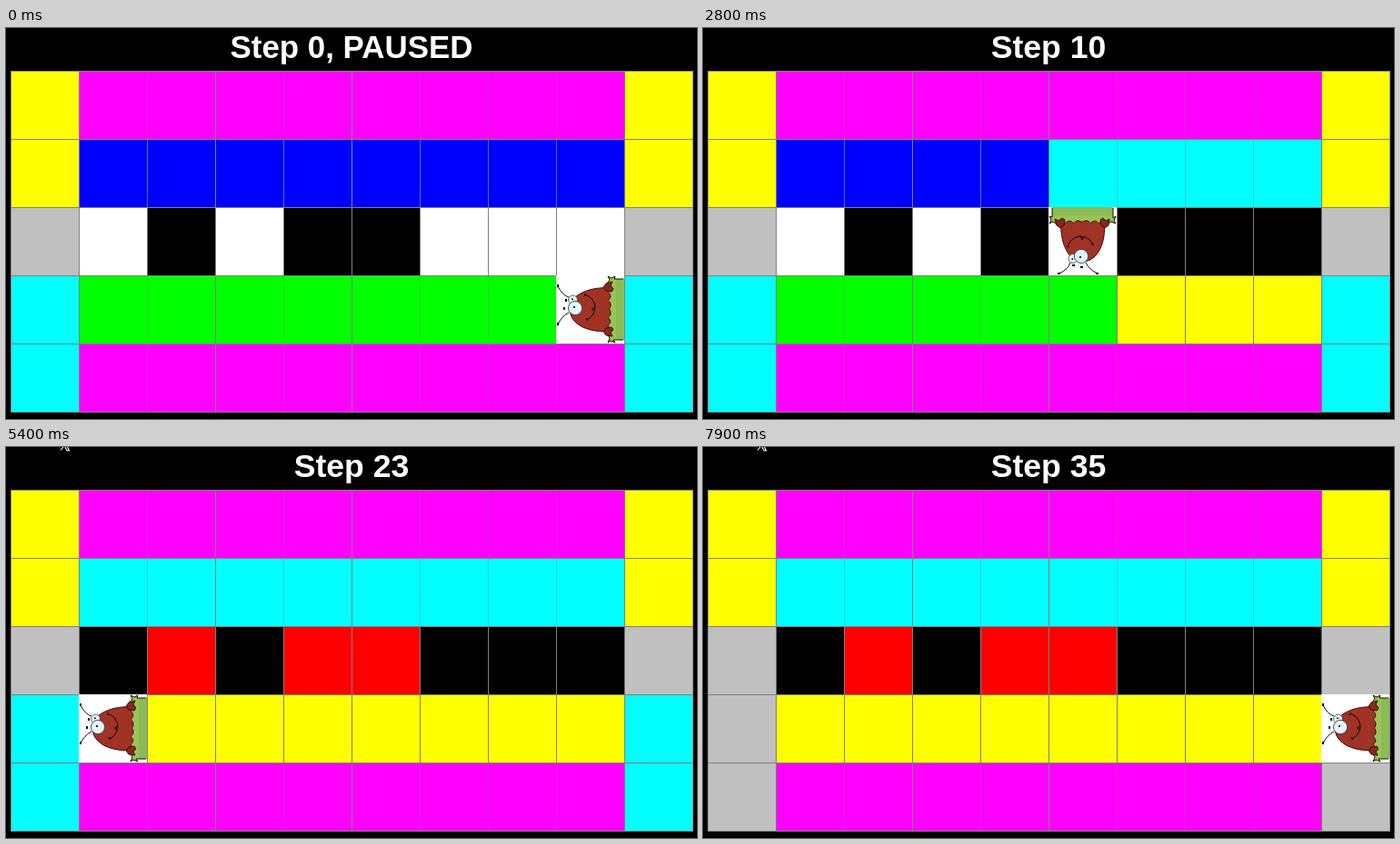
Animation of 760 by 430 pixels, one loop 8000 ms. Source, as an HTML page:

```html
<!DOCTYPE html>
<html lang="en">
<head>
<meta charset="utf-8">
<title>Grid walker</title>
<style>
  html, body { margin: 0; width: 100%; height: 100%; overflow: hidden; background: #000; }
  svg { display: block; }
  #title { font: bold 35.6px "Liberation Sans", Arial, sans-serif; fill: #fff; text-anchor: middle; }
  #title.paused { font-size: 34.9px; }
  #grid { shape-rendering: crispEdges; }
  .ink { fill: none; stroke: #1a0805; stroke-width: 1; }
</style>
</head>
<body>
<svg width="760" height="430" viewBox="0 0 760 430">
  <rect width="760" height="430"/>
  <text id="title" x="380" y="33"></text>
  <g id="grid"></g>
  <g id="beast">
    <rect width="75" height="75" fill="#fff" shape-rendering="crispEdges"/>
    <!-- body -->
    <path d="M14 60C11 38 20 15 38 15C54 15 63 38 61 60Z" fill="#a03326" stroke="#3a0d08"/>
    <!-- ledge -->
    <path d="M4 75V63L1 65L3 60L1 57L6 59L11 56L15 60L20 58L24 61L29 58L33 62L38 59L43 62L47 58L52 61L57 58L62 60L66 56L70 59L74 57L72 61L74 65L71 64V75Z" fill="#98c456"/>
    <path d="M5 66H71V75H5Z" fill="#8abb54"/>
    <path class="ink" stroke-width=".8" stroke="#3f5a22" d="M4 74V63L1 65L3 60L1 57L6 59L11 56M66 56L70 59L74 57L72 61L74 65L71 64V74"/>
    <path d="M15 59L20 57L24 60L29 57L33 61L38 58L43 61L47 57L52 60L57 57L62 59" fill="none" stroke="#4d2a16" stroke-width=".8"/>
    <!-- feet -->
    <path d="M8 62L9 55L13 52L17 55L18 61L15 63L12 60ZM57 61L58 55L62 52L66 55L68 62L64 60L60 63Z" fill="#8a271d" stroke="#2a0805" stroke-width=".9"/>
    <!-- smile -->
    <path class="ink" d="M26 33Q29 42 40 43Q51 42 54 31M25 35L28 33M52 31L55 32M36 43L38 39L40 43"/>
    <!-- antennae -->
    <path class="ink" stroke-width=".9" d="M34 14Q30 6 21 2M51 14Q53 7 63 2"/>
    <path d="M20 1h3v2h-3zM62 1h3v2h-3zM37 8h3v2h-3zM46 10h3v2h-3z" fill="#000"/>
    <!-- eyes -->
    <circle cx="48" cy="18.5" r="5" fill="#e4f3f8" stroke="#36454c" stroke-width=".8"/>
    <circle cx="39" cy="21" r="7.6" fill="#e4f5fa" stroke="#36454c" stroke-width=".9"/>
    <path d="M39 19h2v2h-2zM48 17h1.5v2h-1.5z" fill="#222"/>
  </g>
  <path id="pointer" fill="none" stroke="#fff" stroke-width="1.1"/>
</svg>
<script>
const SIZE = 75, LEFT = 5, TOP = 47, COLS = 10;
const START = ["YMMMMMMMMY", "YBBBBBBBBY", "SWKWKKWWWS", "CGGGGGGGGC", "CMMMMMMMMC"];
const COLOR = {
  Y: "#ff0", M: "#f0f", B: "#00f", S: "#c0c0c0", W: "#fff",
  K: "#000", C: "#0ff", G: "#0f0", R: "#f00"
};
// colour under the beast: [quarter turns, new colour]
const RULE = { G: [1, "Y"], B: [-1, "C"], C: [-1, "S"], W: [0, "K"], K: [0, "R"], M: [0, "M"] };
const FAINT = { M: .25, G: .3, C: .35, B: .8 };
const STRONG_COLS = [0, 1, 3, 5, 9];
const MOVES = [[-1, 0], [0, 1], [1, 0], [0, -1]];

const byId = id => document.getElementById(id);
const grid = byId("grid"), title = byId("title"), beast = byId("beast"), pointer = byId("pointer");

function box(x, y, width, height, fill) {
  const el = document.createElementNS("http://www.w3.org/2000/svg", "rect");
  for (const [key, val] of Object.entries({ x, y, width, height, fill })) el.setAttribute(key, val);
  return grid.appendChild(el);
}

const cells = START.map((row, r) => [...row].map((_, c) => {
  const x = LEFT + c * SIZE, y = TOP + r * SIZE;
  return { fill: box(x, y, SIZE, SIZE), edge: box(x, y, 1, SIZE, "#808080") };
}));
for (let r = 0; r <= START.length; r++) box(LEFT, TOP + r * SIZE, COLS * SIZE + 1, 1, "#808080");
box(LEFT + COLS * SIZE, TOP, 1, START.length * SIZE, "#808080");

// Odd ticks count, turn and recolour; even ticks walk one cell.
function simulate(ticks) {
  const map = START.map(row => [...row]);
  let r = 3, c = 8, dir = 3, step = 0;
  for (let i = 1; i <= ticks; i++) {
    if (i % 2) {
      const [turn, next] = RULE[map[r][c]];
      dir = (dir + turn + 4) % 4;
      map[r][c] = next;
      step = (i - 1) / 2;
    } else {
      r += MOVES[dir][0];
      c += MOVES[dir][1];
    }
  }
  return { map, r, c, dir, step };
}

function draw(ticks) {
  const { map, r, c, dir, step } = simulate(ticks);
  cells.forEach((row, y) => row.forEach((cell, x) => {
    const key = map[y][x];
    cell.fill.setAttribute("fill", COLOR[key]);
    cell.edge.setAttribute("opacity", STRONG_COLS.includes(x) ? 1 : FAINT[key] || 1);
  }));
  beast.setAttribute("transform",
    `translate(${LEFT + c * SIZE} ${TOP + r * SIZE}) rotate(${dir * 90} ${SIZE / 2} ${SIZE / 2})`);
  title.textContent = `Step ${step}` + (ticks ? "" : ", PAUSED");
  title.setAttribute("class", ticks ? "" : "paused");
  pointer.setAttribute("d", ticks < 28 ? "" :
    ticks < 30 ? "M62 0L63 .8M67 0L69 3H71L70 0" : "M60 3.5L63 0M65 0L67 4H69.5L67.5 0");
}

const begin = performance.now();
let shown = -1;
function frame() {
  const t = (performance.now() - begin) % 8000;
  const ticks = t < 800 ? 0 : Math.min(71, Math.floor((t - 700) / 100));
  if (ticks !== shown) draw(shown = ticks);
  requestAnimationFrame(frame);
}
frame();
</script>
</body>
</html>
```
